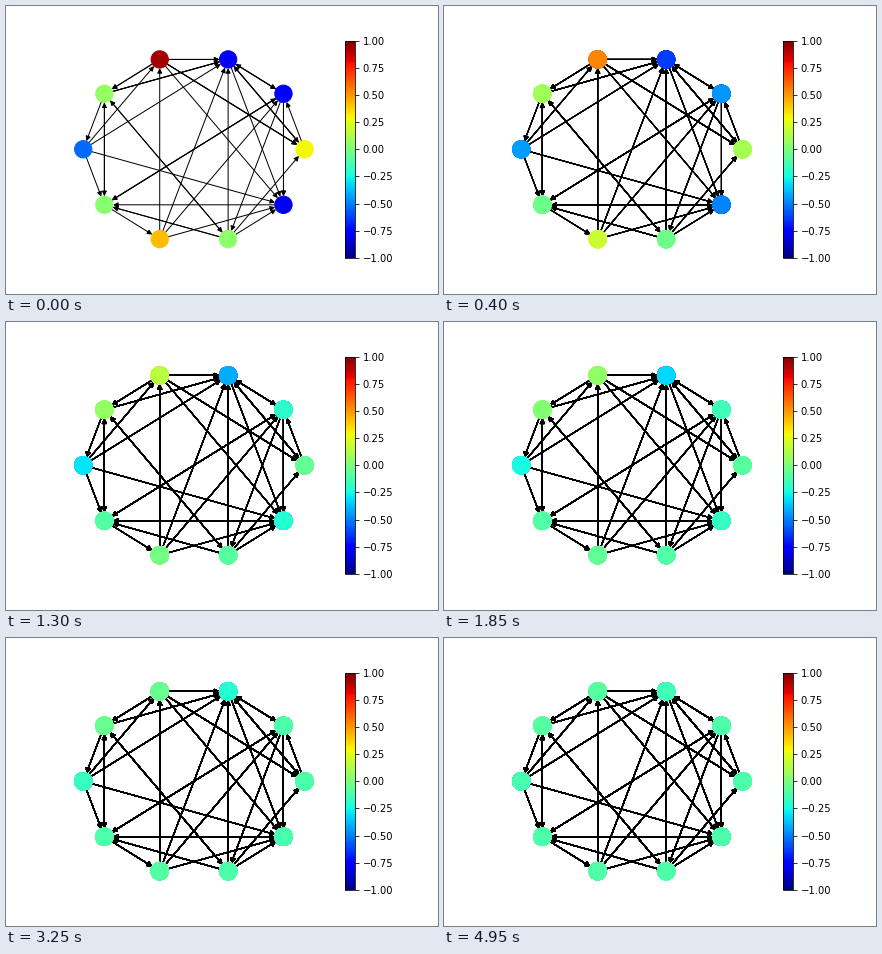
A matplotlib script for the animation above (5000 ms loop, 432 px wide and 288 px high).

```python
import numpy as np
import matplotlib.pyplot as plt
from matplotlib.animation import FuncAnimation
from matplotlib.cm import ScalarMappable
from matplotlib.colors import Normalize
from matplotlib.patches import FancyArrowPatch

W, H, DPI = 432, 288, 72
FRAMES, INTERVAL = 100, 50
NODE_AREA = 300

# Directed graph: node -> targets; a repeated target is a stronger link.
GRAPH = {
    0: (1, 2, 2),
    1: (2, 6, 6, 8, 9, 9),
    2: (0, 1, 1, 9),
    3: (0, 0, 0, 2, 2, 4, 4, 9),
    4: (2, 2, 2, 5, 6, 8),
    5: (2, 3, 6, 9),
    6: (1, 4, 7),
    7: (1, 2, 3, 9),
    8: (0, 2, 4, 6, 6, 9),
    9: (6,),
}

# Opinions settle on their mean; a few nodes keep a slowly fading share.
START = np.array([0.29, -0.77, -0.78, 0.93, 0.06, -0.54, 0.03, 0.42, 0.04, -0.80])
SLOW_SHARE = {2: -0.65, 3: 0.38, 4: 0.44, 5: -0.40, 7: 0.07, 9: -0.06}
SLOW_RATE, FAST_RATE = 0.03, 0.08


def node_values():
    """Opinion of every node (columns) in every frame (rows)."""
    mean = START.mean()
    slow = np.array([SLOW_SHARE.get(i, 0) for i in GRAPH])
    fast = START - mean - slow
    t = np.arange(FRAMES)[:, None]
    return mean + slow * np.exp(-SLOW_RATE * t) + fast * np.exp(-FAST_RATE * t)


def render_links(fig, ax, pos):
    """Draw the arrows once and return them as a brightness image."""
    arrows = [
        ax.add_patch(FancyArrowPatch(
            pos[a], pos[b], arrowstyle="-|>", mutation_scale=10,
            shrinkA=0, shrinkB=np.sqrt(NODE_AREA) / 2,
            linewidth=1, color="k"))
        for a, targets in GRAPH.items() for b in targets
    ]
    fig.canvas.draw()
    image = np.asarray(fig.canvas.buffer_rgba())[..., 0] / 255.0
    for arrow in arrows:
        arrow.remove()
    return image


fig = plt.figure(figsize=(W / DPI, H / DPI), dpi=DPI, facecolor="white")
left, bottom, width, height = 0.125, 0.125, 0.775, 0.755
ax = fig.add_axes([left, bottom, 0.8 * width, height])
ax.axis("off")

angle = 2 * np.pi * np.arange(len(GRAPH)) / len(GRAPH)
pos = np.column_stack([np.cos(angle), np.sin(angle)])
x_lim, y_lim = 1.21 * pos.max(axis=0)
ax.set_xlim(-x_lim, x_lim)
ax.set_ylim(-y_lim, y_lim)

links = render_links(fig, ax, pos)
link_image = fig.figimage(links, cmap="gray", vmin=0, vmax=1,
                          origin="upper", zorder=-1)

norm = Normalize(-1, 1)
values = node_values()
nodes = ax.scatter(pos[:, 0], pos[:, 1], s=NODE_AREA, c=values[0], cmap="jet",
                   norm=norm, linewidths=1, edgecolors="face", zorder=2)

bar_width = height * H / 20 / W
cax = fig.add_axes([left + 0.85 * width, bottom, bar_width, height])
fig.colorbar(ScalarMappable(norm, "jet"), cax=cax, ticks=np.linspace(-1, 1, 9))


def update(frame):
    # Layers pile up without clearing, so soft edges harden over time.
    layers = frame + 1
    link_image.set_data(links ** layers)
    nodes.set_offsets(np.tile(pos, (layers, 1)))
    nodes.set_array(values[:layers].ravel())
    return link_image, nodes


anim = FuncAnimation(fig, update, frames=FRAMES, interval=INTERVAL,
                     repeat=True, repeat_delay=0)
plt.show()
```
